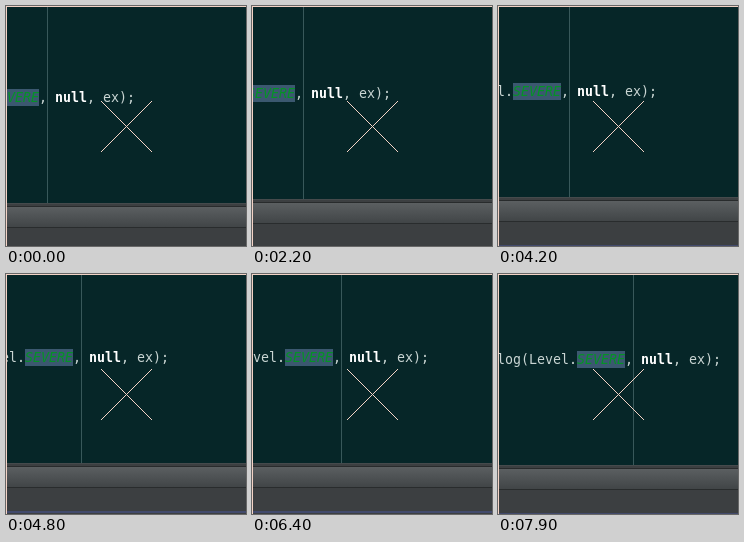
An HTML page for the animation above (8 s loop, 240 by 240 pixels).

```html
<!DOCTYPE html>
<html lang="en">
<head>
<meta charset="utf-8">
<title>Magnified code</title>
<style>
  html, body { margin: 0; width: 100%; height: 100%; overflow: hidden; background: #062628; }
  svg { display: block; width: 240px; height: 240px; }
  text { font: 13.29px "DejaVu Sans Mono", monospace; fill: #c9d5d3; white-space: pre; }
  .keyword { font-weight: bold; fill: #fff; }
  .constant { font-style: italic; fill: #049326; }
</style>
</head>
<body>
<svg viewBox="0 0 240 240">
  <defs>
    <linearGradient id="bar" x1="0" y1="0" x2="0" y2="1">
      <stop offset="0" stop-color="#5b5f61"/>
      <stop offset="1" stop-color="#414547"/>
    </linearGradient>
  </defs>
  <rect width="240" height="240" fill="#062628"/>

  <!-- origin: margin guide, bottom of the editor -->
  <g id="code">
    <rect x="-56" y="-114" width="48" height="17" fill="#3b5870"/>
    <rect y="-200" width="1" height="200" fill="#38585a"/>
    <text x="-136" y="-101">log(Level.<tspan class="constant">SEVERE</tspan>, <tspan class="keyword">null</tspan>, ex);</text>
  </g>

  <g id="panel">
    <rect width="240" height="60" fill="#3c3f41"/>
    <rect width="240" height="1" fill="#454a4c"/>
    <rect y="3" width="240" height="1" fill="#282b2c"/>
    <rect y="4" width="240" height="20" fill="url(#bar)"/>
    <rect y="24" width="240" height="1" fill="#292c2d"/>
    <rect y="48" width="240" height="2" fill="#424a6c"/>
  </g>

  <g fill="none" stroke="#f3d3c6" shape-rendering="crispEdges">
    <path d="M0 .5H240M.5 0V240"/>
    <path d="M95 95L146 146M146 95L95 146"/>
  </g>
</svg>
<script>
  const LOOP = 8000;

  // [time, guide x, editor bottom]
  const steps = [
    [0, 41, 197], [500, 43, 197], [800, 45, 195], [1200, 47, 195], [1700, 49, 195],
    [2100, 49, 193], [2200, 51, 193], [3100, 53, 193], [3300, 55, 193], [3600, 57, 193],
    [3800, 61, 193], [3900, 65, 191], [4000, 69, 191], [4200, 71, 191], [4400, 73, 191],
    [4600, 75, 191], [4800, 75, 189], [4900, 77, 189], [5200, 79, 189], [5600, 81, 189],
    [5800, 83, 189], [6000, 85, 189], [6200, 87, 189]
  ];

  // Glide in 100 ms ticks on the two-pixel grid of the magnifier.
  function glide(start, count, from, to, bottomAt) {
    for (let i = 0; i < count; i++) {
      const x = from + 2 * Math.round((to - from) * i / (count - 1) / 2);
      steps.push([start + i * 100, x, bottomAt(i)]);
    }
  }
  glide(6400, 9, 89, 109, () => 189);
  glide(7300, 7, 113, 135, i => i < 3 ? 189 : 191);

  function play(id, place) {
    const frames = steps.map(([time, x, y]) => ({
      offset: time / LOOP, transform: place(x, y), easing: "step-end"
    }));
    frames.push({ ...frames[frames.length - 1], offset: 1 });
    document.getElementById(id).animate(frames, { duration: LOOP, iterations: Infinity });
  }
  play("code", (x, y) => `translate(${x}px, ${y}px)`);
  play("panel", (x, y) => `translate(0px, ${y}px)`);
</script>
</body>
</html>
```
